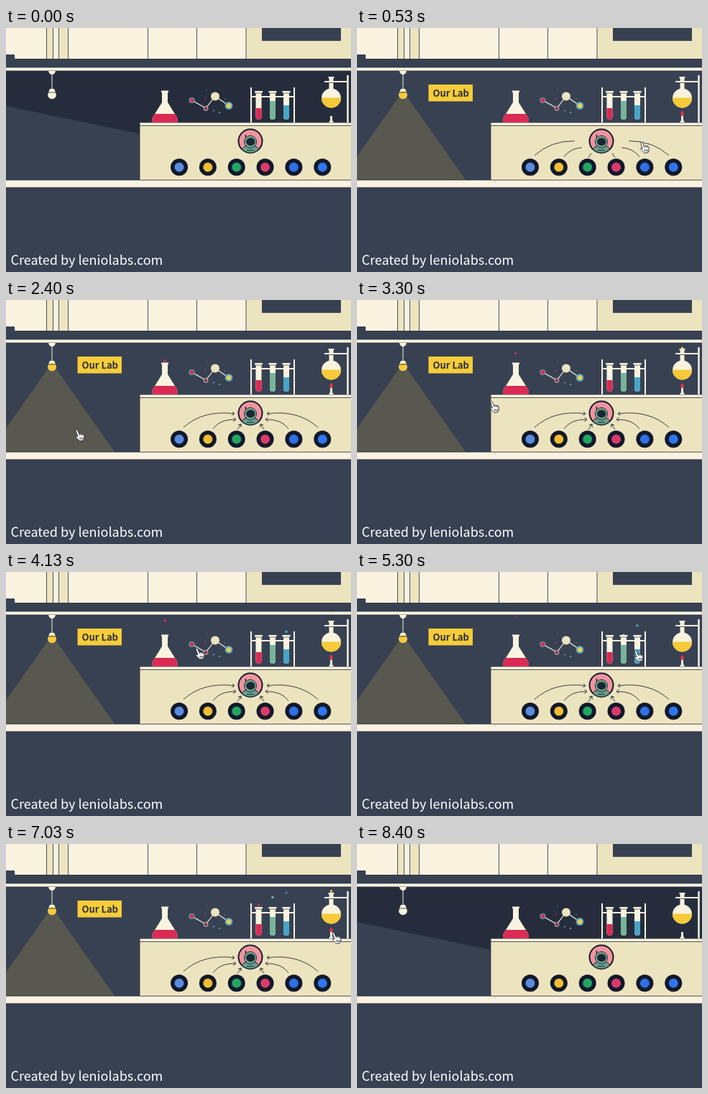
Animation of 480x341 px, one loop 9070 ms. Source, as an HTML page:

```html
<!DOCTYPE html>
<html lang="en">
<head>
<meta charset="utf-8">
<title>Our Lab</title>
<style>
  html, body { margin: 0; width: 100%; height: 100%; overflow: hidden; background: #374152; }
  svg { display: block; width: 100vw; height: 100vh; }
  text { font-family: "Noto Sans CJK JP", "Noto Sans CJK SC", "Noto Sans CJK", "Noto Sans", sans-serif; }
  .cream { fill: #f9f3df; }
  .sand { fill: #ece4bf; }
  .slate { fill: #374152; }
  .ink { stroke: #272d38; fill: none; }
  .glass { stroke: #f9f3df; fill: none; }
</style>
</head>
<body>
<svg viewBox="0 0 480 341">
  <defs>
    <clipPath id="flaskClip"><path d="M217 89V104L204 125Q201 132 206 132H236Q241 132 238 125L225 104V89Z"/></clipPath>
    <clipPath id="roundClip"><circle cx="452.5" cy="98" r="13.5"/></clipPath>
    <clipPath id="faceClip"><circle cx="340" cy="158" r="16"/></clipPath>
    <marker id="head" viewBox="0 0 6 6" refX="5" refY="3" markerWidth="5.500" markerHeight="5.500" markerUnits="userSpaceOnUse" orient="auto">
      <path class="ink" d="M1 0L5 3L1 6"/>
    </marker>
  </defs>

  <!-- upper floor -->
  <rect class="slate" width="480" height="341"/>
  <rect class="cream" width="480" height="43"/>
  <path class="sand" d="M56 0H66V43H56ZM74 0H86V43H74ZM334 0H480V43H334Z"/>
  <path class="ink" stroke-width=".8" d="M56.500 0V43M65.500 0V43M73.500 0V43M86.500 0V43M197.500 0V43M265.500 0V43M334 0V43M0 43.500H480"/>
  <path class="slate" d="M356 0H466V18H356ZM0 37H12V44H0Z"/>

  <!-- lab wall -->
  <rect y="60" width="480" height="152" fill="#252d3d"/>
  <path class="slate" d="M0 109L186 148V212H0Z"/>
  <g id="lit" opacity="0">
    <rect class="slate" y="60" width="480" height="152"/>
    <path d="M60 94H68L151 212H-23Z" fill="#59584f"/>
    <rect x="99.500" y="79" width="61.500" height="23.500" fill="#f8cc39"/>
    <text x="105.500" y="95.500" font-size="13" font-weight="700" fill="#2b303a">Our Lab</text>
  </g>
  <rect class="cream" y="55" width="480" height="5"/>
  <path class="ink" stroke-width=".8" d="M0 55H480M0 60H480"/>

  <!-- lamp -->
  <path class="cream" d="M59 60H69Q68 65 64 65Q60 65 59 60Z"/>
  <path class="glass" d="M64 64V86"/>
  <path class="cream" d="M61 85H67L69 90H59Z"/>
  <circle class="cream" cx="64" cy="93.500" r="5.800"/>
  <circle id="bulb" cx="64" cy="93.500" r="5.500" fill="#f8c936" opacity="0"/>
  <path class="ink" stroke-width=".8" d="M59 90H69"/>

  <!-- counter and floor -->
  <rect class="sand" x="186" y="136" width="294" height="76"/>
  <rect class="cream" x="186" y="132" width="294" height="4.500"/>
  <path class="ink" stroke-width=".8" d="M480 132H186V212M186 136.500H480"/>
  <rect y="212" width="480" height="11" fill="#fdf2e2"/>
  <path class="ink" stroke-width=".8" d="M0 212.500H480M0 223H480"/>

  <!-- bubbles rise behind the glass -->
  <g id="bubbles"></g>

  <!-- conical flask -->
  <g clip-path="url(#flaskClip)">
    <rect class="cream" x="200" y="88" width="42" height="44"/>
    <rect x="200" y="120" width="42" height="13" fill="#d92c55"/>
  </g>
  <rect class="cream" x="216" y="87.500" width="10" height="2.500"/>

  <!-- molecule -->
  <path class="glass" stroke-width="1.200" d="M258.500 101L278 112L291 95.500L310 108.500"/>
  <circle cx="258.500" cy="101" r="3.500" fill="#d92c55" stroke="#54a7b5" stroke-width="1.200"/>
  <circle cx="278" cy="112.500" r="3" fill="#8d3c57" stroke="#d9d1c5" stroke-width=".8"/>
  <circle class="sand" cx="291" cy="95.500" r="6"/>
  <circle cx="310" cy="108.500" r="4.500" fill="#e8cb58" stroke="#4f9fbd" stroke-width="2"/>
  <g fill="#4f9fbd"><circle cx="279" cy="87" r=".7"/><circle cx="289" cy="115.500" r="1.100"/><circle cx="297" cy="118" r="1.200"/><circle cx="305" cy="99" r=".8"/></g>
  <circle cx="277" cy="98.500" r="1" fill="#d92c55"/>

  <g id="rack"></g>

  <!-- round flask and burner -->
  <path class="glass" stroke-width="2.500" d="M475.500 66V132"/>
  <rect class="cream" x="449.500" y="69" width="6" height="18"/>
  <rect class="cream" x="448.500" y="68" width="8" height="2"/>
  <g clip-path="url(#roundClip)">
    <rect class="cream" x="438" y="83" width="30" height="30"/>
    <rect x="438" y="97.500" width="30" height="15" fill="#f6c937"/>
  </g>
  <path class="glass" stroke-width="1.800" d="M443 75H476"/>
  <path class="ink" stroke-width=".7" d="M449.500 76.500H456"/>
  <path class="cream" d="M451 123H454V129L456 132H449L451 129Z"/>
  <path id="flame" d="M452.500 116Q456 120 454 123H451Q449 120 452.500 116Z" fill="#df3850" opacity="0"/>

  <!-- astronaut badge -->
  <circle cx="340" cy="158" r="16.500" fill="#f2949f" stroke="#141a2a" stroke-width="2"/>
  <g clip-path="url(#faceClip)" stroke="#202b36">
    <path d="M333.500 159V149" stroke-width="1.500"/>
    <path d="M328 177V170Q330 165 336 165H344Q350 165 352 170V177Z" fill="#679f8b"/>
    <circle cx="340" cy="159" r="8.500" fill="#72ab95"/>
    <rect x="334.500" y="154" width="11.500" height="10" rx="5" fill="#1d2632"/>
    <path d="M335 171H345" stroke-width="1"/>
  </g>

  <g id="icons"></g>
  <g id="arrows" class="ink" stroke-width=".9"></g>
  <text x="6.500" y="331" font-size="18" font-weight="500" fill="#fff">Created by leniolabs.com</text>

  <g id="hand" stroke="#20242c" stroke-width=".9" stroke-linejoin="round">
    <path fill="#fff" d="M0 1.500Q1 -.5 2.500 1L5 6.500Q6 5 7.300 6.300Q8.500 5.300 9.600 6.700Q11 6.200 11.700 7.800L12 12L10.500 15.500L5.500 16L1 11.500Q-1 9.500 .8 9L3 10Z"/>
    <path fill="none" d="M5 6.500L5.700 8.500M7.300 6.300L8 8.300M9.600 6.700L10 8.700M6 11V14M8 11V14M10 11V14"/>
  </g>
</svg>

<script>
const LOOP = 9070, ON = 30, OFF = 7250;
const RED = '#d92c55', GREEN = '#76b497', BLUE = '#4aa5c5', YELLOW = '#f6c937';
const $ = id => document.getElementById(id);
const clamp = v => Math.min(1, Math.max(0, v));
const smooth = v => v * v * (3 - 2 * v);
const linear = p => p;
const easeOut = p => 1 - (1 - p) ** 2;

const tube = (x, level, color) => `
  <path class="cream" d="M${x - 4} 90H${x + 4}V124a4 4 0 0 1 -8 0Z"/>
  <path d="M${x - 4} ${level}H${x + 4}V124a4 4 0 0 1 -8 0Z" fill="${color}"/>
  <rect class="cream" x="${x - 5.5}" y="88" width="11" height="2.500"/>
  <path class="ink" stroke-width=".6" d="M${x - 4.5} 91H${x + 4.5}"/>`;
$('rack').innerHTML =
  '<path class="glass" stroke-width="2" d="M341 83V132M401 83V132"/>' +
  tube(351.5, 112, RED) + tube(371, 102, GREEN) + tube(390, 108, BLUE) +
  '<path class="glass" stroke-width="2" d="M340 96H402"/>';

const icons = ['#5b8be0', '#f0bd32', '#21a565', '#d93c6c', '#2f70ea', '#2f76ee'];
$('icons').innerHTML = icons.map((color, i) => {
  const x = 241 + i * 39.85;
  return `<circle cx="${x}" cy="194.500" r="12" fill="#12182a"/><circle cx="${x}" cy="194.500" r="6.500" fill="${color}"/>`;
}).join('');

// Three arrows, mirrored about the badge
const curves = ['M247 178Q275 153 318 159', 'M288 180Q298 166 320 167', 'M322 181L327 173.500'];
const side = curves.map(d => `<path d="${d}" pathLength="1"/>`).join('');
$('arrows').innerHTML = side + `<g transform="matrix(-1 0 0 1 681 0)">${side}</g>`;
const arrows = [...$('arrows').querySelectorAll('path')];

const bubbles = [
  { x: 221, from: 115, to: 62, start: 600, span: 5300, ease: easeOut, color: RED },
  { x: 452.5, from: 97, to: 56, start: 700, span: 3600, ease: linear, color: YELLOW },
  { x: 351.5, from: 108, to: 67, start: 5010, span: 6000, ease: easeOut, color: RED },
  { x: 371, from: 108, to: 67, start: 3600, span: 6000, ease: easeOut, color: GREEN },
  { x: 390, from: 108, to: 67, start: 1950, span: 6000, ease: easeOut, color: BLUE }
];
$('bubbles').innerHTML = bubbles.map(b => `<circle cx="${b.x}" r="1.800" fill="${b.color}"/>`).join('');
const dots = [...$('bubbles').children];

// Pointer stops: time, x, y
const stops = [
  [30, 486, 150], [1200, 252, 172], [1450, 252, 172], [2250, 97, 181], [2650, 97, 181],
  [3900, 264, 106], [4300, 264, 106], [5150, 386, 109], [5650, 386, 109],
  [6500, 454, 123], [7080, 454, 123], [7450, 486, 135]
];

function pointer(t) {
  const i = stops.findIndex(s => s[0] > t);
  if (i < 1) return [500, 150];
  const [a, b] = [stops[i - 1], stops[i]];
  const k = smooth((t - a[0]) / (b[0] - a[0]));
  return [a[1] + (b[1] - a[1]) * k, a[2] + (b[2] - a[2]) * k];
}

function draw(t) {
  const light = smooth(clamp((t - ON) / 300)) * (1 - smooth(clamp((t - OFF) / 300)));
  for (const id of ['lit', 'bulb', 'flame', 'arrows']) $(id).setAttribute('opacity', light);
  const flicker = 1 + .15 * Math.sin(t / 70);
  $('flame').setAttribute('transform', `translate(0 123) scale(1 ${flicker}) translate(0 -123)`);

  const drawn = smooth(clamp((t - ON) / 700));
  for (const a of arrows) {
    a.setAttribute('stroke-dasharray', `${drawn} 2`);
    a.setAttribute('marker-end', drawn === 1 ? 'url(#head)' : 'none');
  }

  bubbles.forEach((b, i) => {
    const age = Math.max(0, (t - b.start) / b.span), p = age % 1;
    dots[i].setAttribute('cy', b.from + (b.to - b.from) * b.ease(p));
    dots[i].setAttribute('opacity', age ? light * clamp((1 - p) * 4) : 0);
  });

  $('hand').setAttribute('transform', `translate(${pointer(t)})`);
}

const begin = performance.now();
function tick() {
  const t = (performance.now() - begin) % LOOP;
  // The picture advances 30 ms, then 70 ms
  draw(Math.floor(t / 100) * 100 + (t % 100 >= 30 ? 30 : 0));
  requestAnimationFrame(tick);
}
tick();
</script>
</body>
</html>
```
